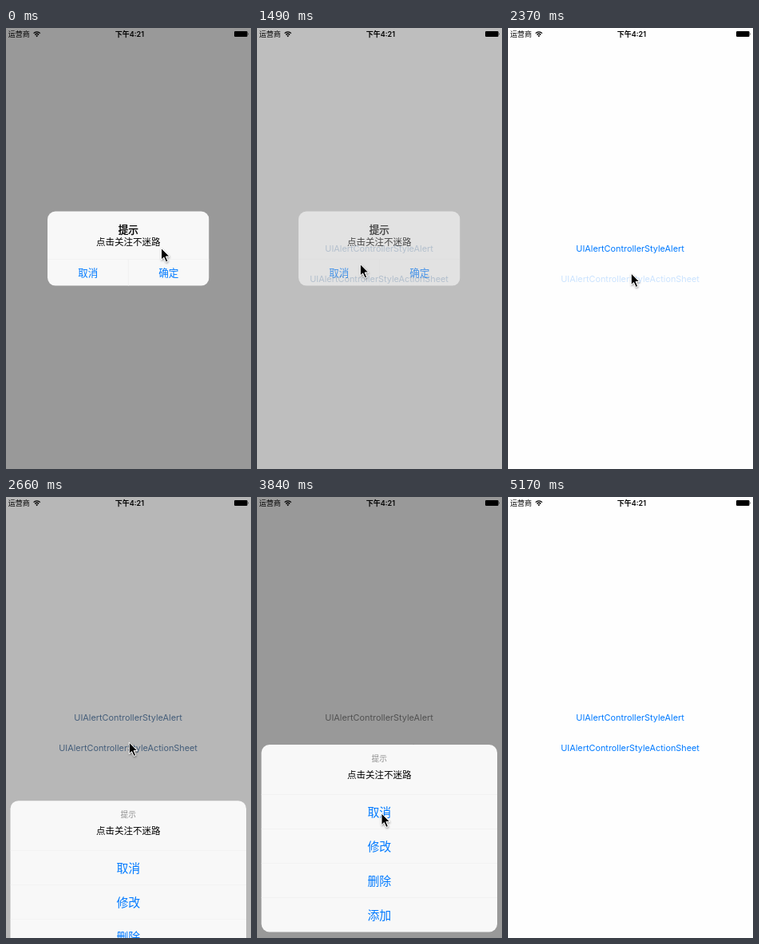
Write an HTML page that moves like this. It is 307 px wide and 552 px high and loops after 5.47 s.

```html
<!DOCTYPE html>
<html lang="zh-CN">
<head>
<meta charset="utf-8">
<style>
html, body { margin: 0; width: 100%; height: 100%; overflow: hidden; background: #fefefe; }
svg { display: block; width: 100%; height: 100%; font-family: Inter, "Noto Sans CJK SC", "Noto Sans CJK", sans-serif; }
.mid { text-anchor: middle; }
.blue { fill: #007aff; }
.line { stroke: #f0f0f0; stroke-width: .7; }
</style>
</head>
<body>
<svg viewBox="0 0 307 552">
  <defs>
    <clipPath id="alertShape"><rect x="52" y="229.6" width="202.5" height="93" rx="10"/></clipPath>
    <filter id="shadow" x="-50%" y="-50%" width="200%" height="200%">
      <feDropShadow dx=".5" dy="1.3" stdDeviation="1" flood-opacity=".4"/>
    </filter>
  </defs>
  <rect width="307" height="552" fill="#fefefe"/>
  <g id="links" class="mid" font-size="10.87">
    <text x="153.1" y="280">UIAlertControllerStyleAlert</text>
    <text id="sheetLink" x="153.1" y="317.5">UIAlertControllerStyleActionSheet</text>
  </g>
  <rect id="dim" width="307" height="552"/>

  <g id="status">
    <text x="2.7" y="11" font-size="9">运营商</text>
    <path d="M34.6 6.6a5.7 5.7 0 0 1 8.2 0M36.3 8.5a3.4 3.4 0 0 1 4.8 0" fill="none" stroke="#000" stroke-width="1.3"/>
    <path d="M37.3 9.7a2 2 0 0 1 2.8 0L38.7 11.2z"/>
    <text class="mid" x="154.8" y="11" font-size="9" font-weight="600">下午4:21</text>
    <rect x="286" y="4" width="16.5" height="7" rx="1.2"/>
    <path d="M303 6q1.3 1.5 0 3z"/>
  </g>

  <g id="alert" class="mid" clip-path="url(#alertShape)">
    <rect x="52" y="229" width="202.5" height="94" fill="#f8f8f8"/>
    <rect id="alertPress" x="52" y="289.6" width="101.3" height="33" fill="#e9e9e9"/>
    <path class="line" d="M52 289.6H254.5M153.4 290V323"/>
    <text x="153.3" y="256.6" font-size="12.6" stroke="#000" stroke-width=".4">提示</text>
    <text x="153.3" y="271.8" font-size="11.5">点击关注不迷路</text>
    <g class="blue" font-size="12.6">
      <text x="102.8" y="311">取消</text>
      <text x="203.8" y="311">确定</text>
    </g>
  </g>

  <g id="sheet" class="mid">
    <rect x="5.5" y="310" width="295.5" height="234.5" rx="10" fill="#f8f8f8"/>
    <rect id="sheetPress" x="5.5" y="372.5" width="295.5" height="43" fill="#e9e9e9"/>
    <text x="153.3" y="330.6" font-size="9.7" fill="#8f8f8f">提示</text>
    <text x="153.3" y="352" font-size="11.5">点击关注不迷路</text>
    <g id="rows" class="blue" font-size="14.9"></g>
  </g>

  <path id="cursor" d="M0 0V14.6L3.3 11.5L5.9 17.4L8.4 16.3L5.8 10.5H10.4Z"
        stroke="#fff" stroke-width="1" filter="url(#shadow)"/>
</svg>
<script>
const LOOP = 5470, TICK = LOOP / 37;   // the screen refreshes once per tick
const $ = id => document.getElementById(id);

$('rows').innerHTML = ['取消', '修改', '删除', '添加'].map((label, i) => {
  const y = 372.5 + 43 * i;
  return `<path class="line" d="M5.5 ${y}h295.5"/><text x="153.3" y="${y + 27}">${label}</text>`;
}).join('');

// Cursor moves: start, end, dx, dy
const home = [194.5, 275.5];
const moves = [[330, 890, -65.2, 20], [1500, 2070, 25, 11.5], [2860, 3840, 1.7, 89], [4500, 5170, 94, 179]];

function smooth(t, from, to) {
  const u = Math.min(1, Math.max(0, (t - from) / (to - from)));
  return u * u * (3 - 2 * u);
}

// Critically damped spring: 1 before start, settling to 0
function settle(t, start) {
  const x = Math.max(0, t - start) * .022;
  return (1 + x) * Math.exp(-x);
}

function cursorAt(t) {
  let [x, y] = home;
  for (const [from, to, dx, dy] of moves) {
    const k = smooth(t, from, to);
    x += dx * k;
    y += dy * k;
  }
  return [x, y];
}

function draw(time) {
  const tick = Math.floor((time + 6) / TICK), t = tick * TICK;
  const alert = settle(t, 1420);
  const sheet = (1 - settle(t, 2548)) * settle(t, 4220);
  const dim = Math.max(alert, sheet);
  const mix = (a, b) => Math.round(a + (b - a) * dim);
  const opacity = (id, v) => $(id).setAttribute('opacity', v);
  const move = (id, x, y) => $(id).setAttribute('transform', `translate(${x} ${y})`);

  $('links').setAttribute('fill', `rgb(${mix(0, 135)},${mix(122, 135)},${mix(255, 135)})`);
  opacity('sheetLink', tick === 16 || tick === 17 ? .2 : 1);
  opacity('dim', .4 * dim);
  opacity('alert', alert);
  opacity('alertPress', +(tick === 9));
  opacity('sheetPress', +(tick === 28));
  move('sheet', 0, 242 * (1 - sheet));
  move('cursor', ...cursorAt(t));
}

const begin = performance.now();
function loop() {
  draw((performance.now() - begin) % LOOP);
  requestAnimationFrame(loop);
}
loop();
</script>
</body>
</html>
```
